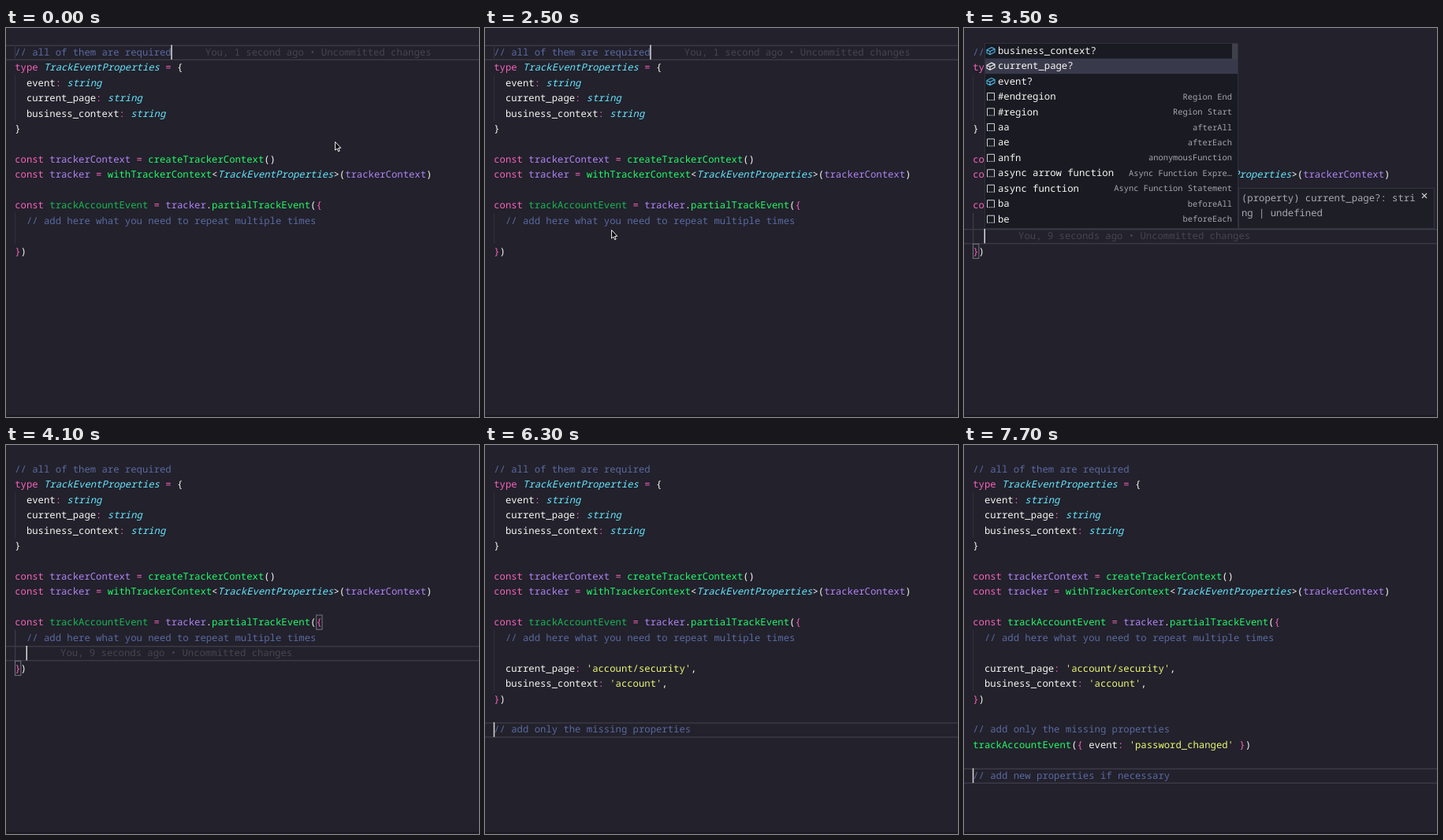
Recreate the animation shown at these times as an HTML page with a canvas. Size 600 by 494 pixels, loop 8 s.

```html
<!DOCTYPE html>
<html lang="en">
<head>
<meta charset="utf-8">
<title>Typed event tracker</title>
<style>
  html, body { margin: 0; width: 100%; height: 100%; overflow: hidden; background: #22212c; }
  canvas { display: block; width: 600px; height: 494px; }
</style>
</head>
<body>
<canvas id="stage"></canvas>
<script>
const W = 600, H = 494, LOOP = 8000, STEP = 100;
const LEFT = 11.2, CELL = 7.35, TOP = 20.9, ROW = 19.45;
const FAMILY = '"Noto Sans Mono", "DejaVu Sans Mono", monospace';
const canvas = document.getElementById('stage');
const ctx = canvas.getContext('2d');
const dpr = window.devicePixelRatio || 1;
canvas.width = W * dpr;
canvas.height = H * dpr;

const COLORS = {
  w: '#f8f8f2', p: '#f763b8', c: '#5b699f', t: '#66e6fb',
  g: '#22fa66', d: '#18b852', v: '#b184f4', y: '#edf872'
};

// Each token is a colour key followed by its text; "t" is italic.
const parse = source => source.split('|').map(s => ({ key: s[0], text: s.slice(1) }));
const lengthOf = tokens => tokens.reduce((n, token) => n + token.text.length, 0);

const HEAD = [
  'c// all of them are required',
  'ptype |tTrackEventProperties |p= |w{',
  'w  event|p: |tstring',
  'w  current_page|p: |tstring',
  'w  business_context|p: |tstring',
  'w}',
  'w',
  'pconst |vtrackerContext |p= |gcreateTrackerContext|w()',
  'pconst |vtracker |p= |gwithTrackerContext|w<|tTrackEventProperties|w>(|vtrackerContext|w)',
  'w'
].map(parse);
const DECLARATION = 'trackAccountEvent |p= |vtracker|w.|gpartialTrackEvent|w(|p{';
const HINT = parse('c  // add here what you need to repeat multiple times');
const CLOSE = parse('p}|w)');
const PAGE = parse("w  current_page|p: |y'account/security'|w,");
const CONTEXT = parse("w  business_context|p: |y'account'|w,");
const MISSING = parse('c// add only the missing properties');
const CALL = parse("gtrackAccountEvent|w(|p{ |wevent|p: |y'password_changed'|p }|w)");
const EXTRA = parse('c// add new properties if necessary');

const TYPED = [
  { row: 13, start: 4300, end: 4800, tokens: PAGE, from: 2 },
  { row: 14, start: 4900, end: 5700, tokens: CONTEXT, from: 2 },
  { row: 18, start: 6700, end: 7200, tokens: CALL, from: 0 }
];

// time, row, column; every stop restarts the blink
const CARET = [
  [-100, 0, 27], [2600, 12, 2], [3300, 12, 2], [4000, 12, 2], [4300, 13, 2],
  [4900, 14, 2], [5800, 15, 2], [5900, 16, 0], [6000, 17, 0], [6700, 18, 0],
  [7300, 19, 0], [7500, 20, 0]
];

const POINTER = [
  [0, 417, 144], [200, 405, 140], [800, 190, 64], [1300, 164, 83],
  [1700, 168, 105], [2200, 162, 235], [2500, 160, 256], [2700, 160, 258]
];

const ITEMS = [
  ['business_context?'], ['current_page?'], ['event?'],
  ['#endregion', 'Region End'], ['#region', 'Region Start'],
  ['aa', 'afterAll'], ['ae', 'afterEach'], ['anfn', 'anonymousFunction'],
  ['async arrow function', 'Async Function Expre…'],
  ['async function', 'Async Function Statement'],
  ['ba', 'beforeAll'], ['be', 'beforeEach']
];

const rowTop = row => TOP + row * ROW;
const colX = col => LEFT + col * CELL;
const clamp = x => Math.max(0, Math.min(1, x));

function rect(x, y, w, h, color) {
  ctx.fillStyle = color;
  ctx.fillRect(x, y, w, h);
}

function outline(x, y, w, h, color) {
  ctx.strokeStyle = color;
  ctx.lineWidth = 1;
  ctx.strokeRect(x, y, w, h);
}

// Monospaced text, one glyph per cell
function mono(text, x, y, color, { size = 12.25, italic = false, cell = CELL } = {}) {
  ctx.font = `${italic ? 'italic ' : ''}500 ${size}px ${FAMILY}`;
  ctx.fillStyle = color;
  [...text].forEach((ch, i) => { if (ch !== ' ') ctx.fillText(ch, x + i * cell, y); });
}

function codeLine(tokens, row, limit = Infinity) {
  let col = 0;
  for (const { key, text } of tokens) {
    const shown = text.slice(0, Math.max(0, limit - col));
    mono(shown, colX(col), rowTop(row) + 13.9, COLORS[key], { italic: key === 't' });
    col += text.length;
  }
}

function typedCount(entry, t) {
  const progress = clamp((t - entry.start) / (entry.end - entry.start));
  return entry.from + Math.round((lengthOf(entry.tokens) - entry.from) * progress);
}

function guide(first, last, color) {
  rect(LEFT, rowTop(first), 1, (last - first + 1) * ROW, color);
}

function bracketBox(col, row) {
  outline(colX(col) + 0.3, rowTop(row) + 0.6, CELL, ROW - 1.2, '#777681');
}

function drawCode(t, closeRow) {
  HEAD.forEach((tokens, row) => codeLine(tokens, row));
  codeLine(parse('pconst |' + (t >= 7300 ? 'g' : 'd') + DECLARATION), 10);
  codeLine(HINT, 11);
  codeLine(CLOSE, closeRow);
  for (const entry of TYPED) {
    if (t >= entry.start) codeLine(entry.tokens, entry.row, typedCount(entry, t));
  }
  if (t >= 6100) codeLine(MISSING, 17);
  if (t >= 7600) codeLine(EXTRA, 20);
}

function caretAt(t) {
  const [since, row, col] = CARET.filter(stop => stop[0] <= t).pop();
  const entry = TYPED.find(e => e.row === row);
  const typing = entry && t <= entry.end;
  return {
    row,
    col: entry ? typedCount(entry, t) : col,
    visible: typing || (t - since) % 830 < 415
  };
}

function drawCurrentLine(row) {
  const y = rowTop(row);
  rect(0, y + 0.8, W, 1.3, '#3d3c48');
  rect(0, y + 18.8, W, 1.3, '#3d3c48');
  if (row === 0) rect(LEFT, y + 3, 1, 15, '#3d3c48');
}

function drawBlame(t) {
  const first = t < 2600;
  if (!first && t >= 4300) return;
  const age = first ? '1 second' : '9 seconds';
  const row = first ? 0 : 12, col = first ? 27 : 2;
  mono(`You, ${age} ago • Uncommitted changes`, colX(col) + 43.2, rowTop(row) + 13.9, '#464551');
}

function cube(x, y, color) {
  ctx.strokeStyle = color;
  ctx.lineWidth = 1.1;
  ctx.beginPath();
  const points = [[-5, -1], [1, -4], [5, -2], [5, 2], [-1, 5], [-5, 3]];
  points.forEach(([dx, dy]) => ctx.lineTo(x + dx, y + dy));
  ctx.closePath();
  ctx.moveTo(x - 5, y - 1);
  ctx.lineTo(x - 1, y + 1);
  ctx.lineTo(x + 5, y - 2);
  ctx.moveTo(x - 1, y + 1);
  ctx.lineTo(x - 1, y + 5);
  ctx.stroke();
}

function snippetIcon(x, y) {
  ctx.strokeStyle = '#d2d2d4';
  ctx.lineWidth = 1;
  ctx.beginPath();
  ctx.moveTo(x - 4.5, y + 4.5);
  ctx.lineTo(x - 4.5, y - 4.5);
  ctx.lineTo(x + 4.5, y - 4.5);
  ctx.lineTo(x + 4.5, y + 4.5);
  ctx.stroke();
  for (let i = 0; i < 4; i++) rect(x - 5 + i * 2.8, y + 4, 1.7, 1, '#d2d2d4');
}

function drawSuggestions(selected) {
  rect(26, 19, 322, 235.5, '#191a22');
  rect(26, 19.3 + selected * ROW, 322, ROW, '#383a4c');
  ITEMS.forEach(([label, detail], i) => {
    const y = 28.7 + i * ROW;
    if (detail) {
      snippetIcon(34, y);
      const cell = 6.24;
      mono(detail, 340 - detail.length * cell, y + 3.6, '#a6a6aa', { size: 10.4, cell });
    } else {
      cube(34, y, i === selected ? '#f8f8f2' : '#4db9e6');
    }
    mono(label, 43, y + 4, '#f8f8f2');
  });
  rect(340, 19.5, 7.5, 20, '#40404a');
  outline(26.5, 19.5, 321, 235, '#30303b');

  rect(348, 203, 249, 52, '#1e1e27');
  outline(348.5, 203.5, 248, 51, '#34343f');
  const info = `(property) ${ITEMS[selected][0]}: string | undefined`;
  mono(info.slice(0, 30), 352, 219.5, '#a9a9ae');
  mono(info.slice(30), 352, 239, '#a9a9ae');
  ctx.strokeStyle = '#d0d0d3';
  ctx.lineWidth = 1.1;
  ctx.beginPath();
  ctx.moveTo(581, 210);
  ctx.lineTo(587, 216);
  ctx.moveTo(587, 210);
  ctx.lineTo(581, 216);
  ctx.stroke();
}

function pointerAt(t) {
  const next = POINTER.findIndex(stop => stop[0] > t);
  if (next < 0) return POINTER[POINTER.length - 1].slice(1);
  const [t0, x0, y0] = POINTER[next - 1], [t1, x1, y1] = POINTER[next];
  const k = (t - t0) / (t1 - t0), e = k * k * (3 - 2 * k);
  return [x0 + (x1 - x0) * e, y0 + (y1 - y0) * e];
}

function drawPointer(t) {
  const [x, y] = pointerAt(t);
  const shape = [[0, 0], [0, 10.6], [2.3, 8.5], [4, 12.2], [5.6, 11.5], [4, 7.9], [7.2, 7.7]];
  ctx.beginPath();
  shape.forEach(([dx, dy]) => ctx.lineTo(x + 0.6 + dx, y + 0.6 + dy));
  ctx.closePath();
  ctx.fillStyle = '#08080c';
  ctx.fill();
  ctx.strokeStyle = '#f2f2f2';
  ctx.lineWidth = 1;
  ctx.stroke();
}

function draw(t) {
  ctx.setTransform(dpr, 0, 0, dpr, 0, 0);
  ctx.textRendering = 'geometricPrecision';
  ctx.textBaseline = 'alphabetic';
  rect(0, 0, W, H, '#22212c');
  rect(0, 491.5, W, 2.5, '#1b1a23');

  const closeRow = t < 4300 ? 13 : t < 4900 ? 14 : 15;
  const inside = t >= 2600 && t < 5800;
  const caret = caretAt(t);

  guide(2, 4, '#34333f');
  guide(11, closeRow - 1, inside ? '#454450' : '#34333f');
  drawCurrentLine(caret.row);
  drawBlame(t);
  drawCode(t, closeRow);
  if (inside) {
    bracketBox(52, 10);
    bracketBox(0, closeRow);
  }
  if (caret.visible) rect(colX(caret.col) - 0.4, rowTop(caret.row) + 0.6, 1.5, 18.6, '#d9d9d6');
  if (t >= 3000 && t < 4000) drawSuggestions(t < 3300 ? 0 : 1);
  if (t < 3000) drawPointer(t);
}

function tick() {
  const t = performance.now() % LOOP;
  draw(Math.floor(t / STEP) * STEP);
  requestAnimationFrame(tick);
}
tick();
</script>
</body>
</html>
```
